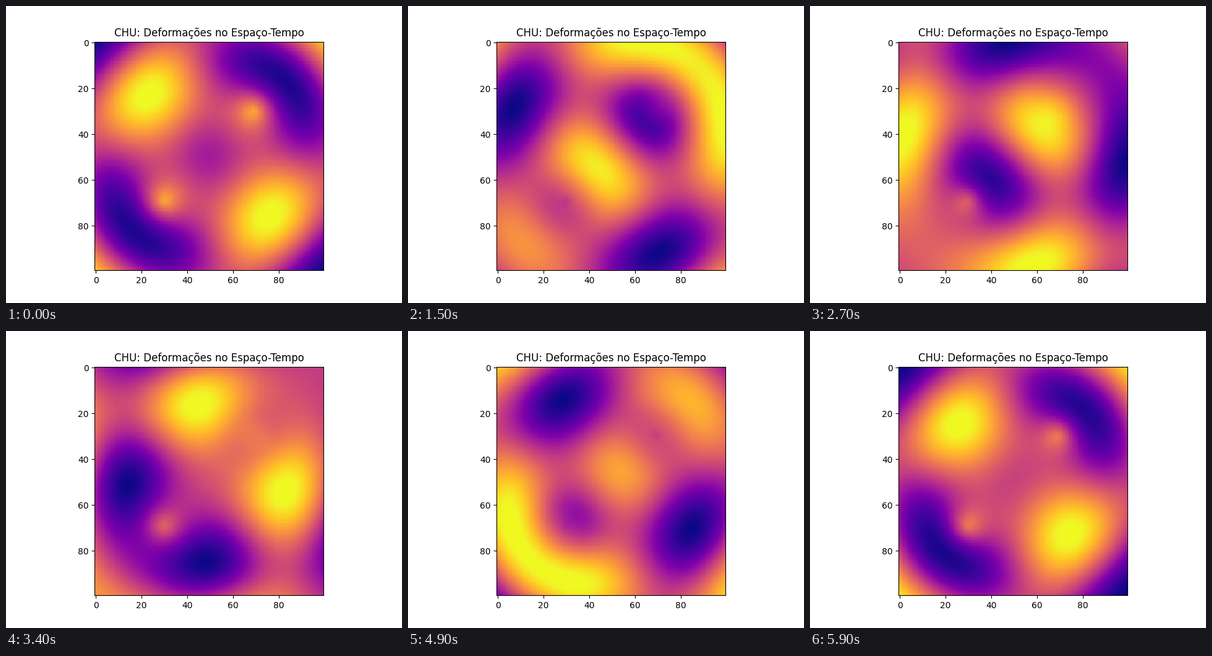
Animation, 640 px wide and 480 px high, one loop 6000 ms. Source, as a matplotlib script:

```python
import numpy as np
import matplotlib.pyplot as plt
from matplotlib.animation import FuncAnimation

FRAMES = 60
INTERVAL = 100

axis = np.linspace(-5, 5, 100)
X, Y = np.meshgrid(axis, axis)
R1 = np.hypot(X - 2, Y + 2)
R2 = np.hypot(X + 2, Y - 2)

# Static peaks at the two wave sources
PEAKS = 0.5 * (np.exp(-2 * R1**2) + np.exp(-2 * R2**2))


def field(frame):
    t = 2 * np.pi * frame / FRAMES
    return np.sin(3 * t - R1) + np.sin(2 * t - R2) + PEAKS


fig, ax = plt.subplots(figsize=(6.4, 4.8), dpi=100)
image = ax.imshow(field(0), cmap="plasma", vmin=-2, vmax=1.9)
ax.set_title("CHU: Deformações no Espaço-Tempo")


def update(frame):
    image.set_data(field(frame))
    return [image]


anim = FuncAnimation(fig, update, frames=FRAMES, interval=INTERVAL,
                     repeat=True, repeat_delay=0)
plt.show()
```
